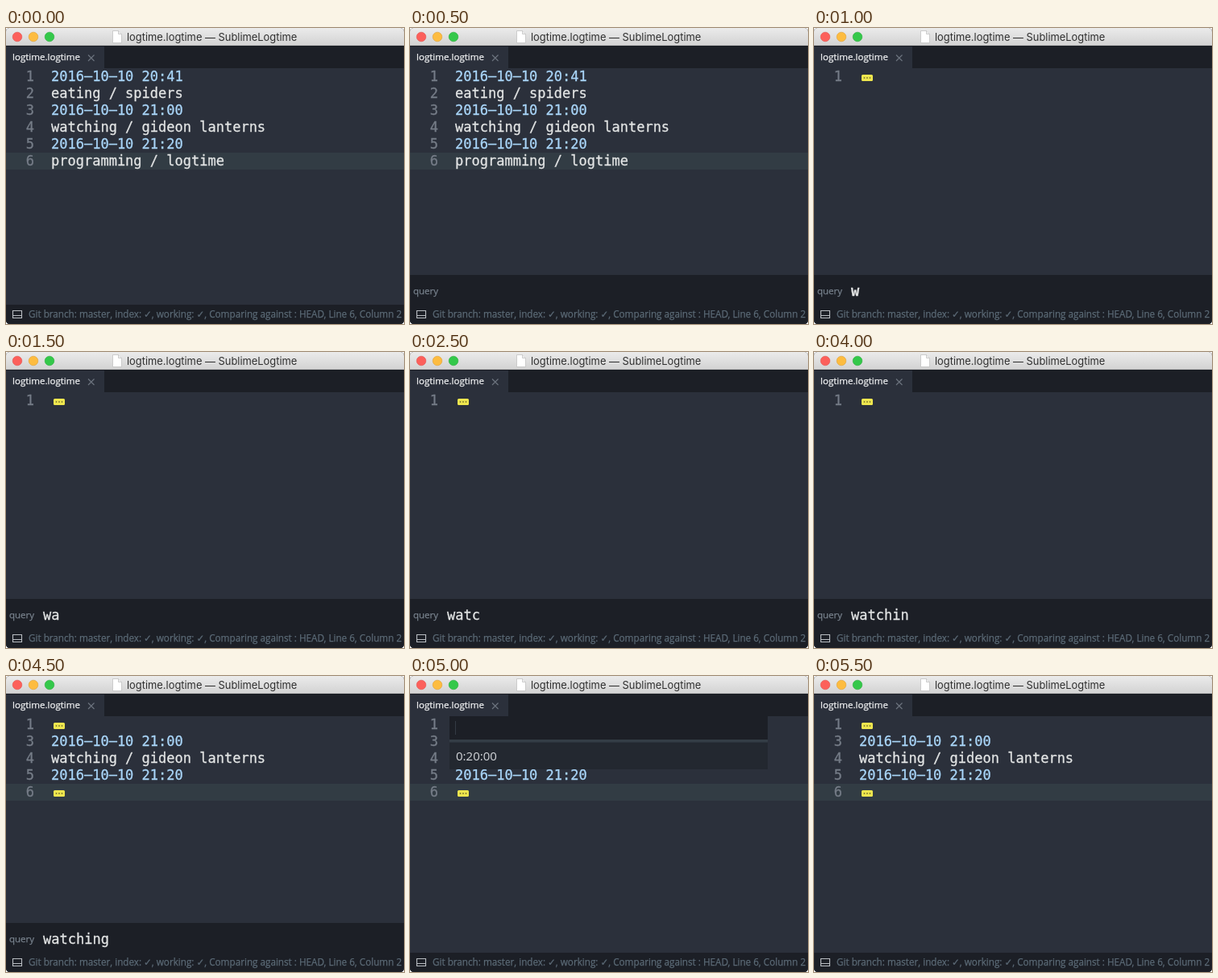
Animation, 494 px wide and 368 px high, one loop 6 s. Source, as an HTML page:

```html
<!DOCTYPE html>
<html lang="en">
<head>
<meta charset="utf-8">
<title>Log filter</title>
<style>
html, body { margin: 0; width: 100%; height: 100%; overflow: hidden; background: #fff; }
svg { display: block; width: 494px; height: 368px; }
text { white-space: pre; }
.code { font: 17px "DejaVu Sans Mono", monospace; fill: #e3e5e5; stroke: #e3e5e5; stroke-width: .3px; }
.date { fill: #a9d5f8; stroke: #a9d5f8; }
.num { fill: #757c87; stroke: #757c87; text-anchor: end; }
.ui { font-family: "Open Sans", "DejaVu Sans", sans-serif; font-size: 11.7px; fill: #5b6a76; stroke: #5b6a76; stroke-width: .25px; }
.tab { font-size: 11.55px; fill: #f2f3f4; stroke: #f2f3f4; }
.label { font-size: 11.5px; fill: #78828d; stroke: #78828d; }
.total { font-size: 15px; fill: #d3d6da; stroke: none; }
.title { font: 12.88px Inter, sans-serif; fill: #303030; }
</style>
</head>
<body>
<svg viewBox="0 0 494 368">
  <defs>
    <linearGradient id="bar" x2="0" y2="1">
      <stop stop-color="#ebebeb"/><stop offset="1" stop-color="#d2d2d2"/>
    </linearGradient>
    <clipPath id="win"><rect width="494" height="368" rx="4.5"/></clipPath>
  </defs>
  <g clip-path="url(#win)">
    <rect width="494" height="368" fill="#2b303b"/>
    <rect width="494" height="22" fill="url(#bar)"/>
    <rect y="21" width="494" height="1" fill="#bdbdbd"/>
    <circle cx="14" cy="11" r="5.8" fill="#fc605b" stroke="#e2504c" stroke-width=".6"/>
    <circle cx="34" cy="11" r="5.8" fill="#fdbc40" stroke="#dfa033" stroke-width=".6"/>
    <circle cx="54" cy="11" r="5.8" fill="#34c84a" stroke="#2bae3c" stroke-width=".6"/>
    <path d="M132.5 3.5h7l4 4v11h-11z" fill="#fff" stroke="#bcbcbc" stroke-width=".7"/>
    <path d="M139.5 3.5v4h4" fill="#eee" stroke="#bcbcbc" stroke-width=".7"/>
    <text class="title" x="150" y="16">logtime.logtime — SublimeLogtime</text>

    <rect y="22" width="494" height="28" fill="#1c1f26"/>
    <rect y="23" width="122" height="27" fill="#2b303b"/>
    <text class="ui tab" x="8" y="40">logtime.logtime</text>
    <path d="M102 33.5l7.5 7.5m0-7.5l-7.5 7.5" stroke="#6d747f" stroke-width="1.1"/>

    <g id="doc"></g>

    <g id="popup">
      <rect x="49" y="50" width="395" height="66" fill="#232830"/>
      <rect x="49" y="50" width="395" height="29" fill="#1c1f26"/>
      <rect x="49" y="79" width="395" height="3.5" fill="#343d46"/>
      <path d="M56.5 56v17" stroke="#343a44"/>
      <text class="ui total" x="57" y="105">0:20:00</text>
    </g>

    <g id="panel">
      <rect y="307" width="494" height="38" fill="#1c1f26"/>
      <text class="ui label" x="4" y="331">query</text>
      <text class="code" id="query" x="46" y="333"></text>
    </g>

    <rect y="344" width="494" height="24" fill="#1c1f26"/>
    <path d="M8.5 351.5h11v9h-11zM9 357.5h10" fill="none" stroke="#b9bdc2" stroke-width="1.1"/>
    <text class="ui" x="28" y="360">Git branch: master, index: ✓, working: ✓, Comparing against : HEAD, Line 6, Column 2</text>
  </g>
</svg>
<script>
const LOOP = 6000, STEP = 500, ROW = 21;
const WORD = "watching";
const LINES = [
  "2016–10–10 20:41", "eating / spiders",
  "2016–10–10 21:00", "watching / gideon lanterns",
  "2016–10–10 21:20", "programming / logtime"
];
const FOLD = "";
const full = LINES.map((text, i) => [i + 1, text]);
const folded = [[1, FOLD]];
const matched = [[1, FOLD], ...full.slice(2, 5), [6, FOLD]];
const $ = id => document.getElementById(id);

function foldMark(y) {
  const dots = [62.5, 66, 69.5].map(x =>
    `<circle cx="${x}" cy="${y + 12}" r=".9" fill="#7d7830"/>`).join("");
  return `<rect x="59" y="${y + 8}" width="14" height="8" rx="1.5" fill="#eee64e"/>${dots}`;
}

function row([num, text], i) {
  const y = 50 + i * ROW;
  const active = num === 6 ? `<rect y="${y}" width="494" height="${ROW}" fill="#323c44"/>` : "";
  const kind = text.startsWith("2016") ? "code date" : "code";
  const body = text === FOLD ? foldMark(y)
    : `<text class="${kind}" x="56" y="${y + 16}">${text}</text>`;
  return `${active}<text class="code num" x="35" y="${y + 16}">${num}</text>${body}`;
}

function show(el, on) {
  el.setAttribute("visibility", on ? "visible" : "hidden");
}

let last = -1;
function draw(time) {
  const step = Math.floor(time % LOOP / STEP);
  if (step !== last) {
    last = step;
    const typed = Math.max(0, step - 1);
    const rows = typed === 0 ? full : typed < WORD.length ? folded : matched;
    $("doc").innerHTML = rows.map(row).join("");
    $("query").textContent = WORD.slice(0, typed);
    $("query").style.fontWeight = typed === 1 ? "bold" : "normal";
    show($("panel"), step >= 1 && step <= 9);
    show($("popup"), step === 10);
  }
}

const start = performance.now();
function tick() {
  draw(performance.now() - start);
  requestAnimationFrame(tick);
}
tick();
</script>
</body>
</html>
```
